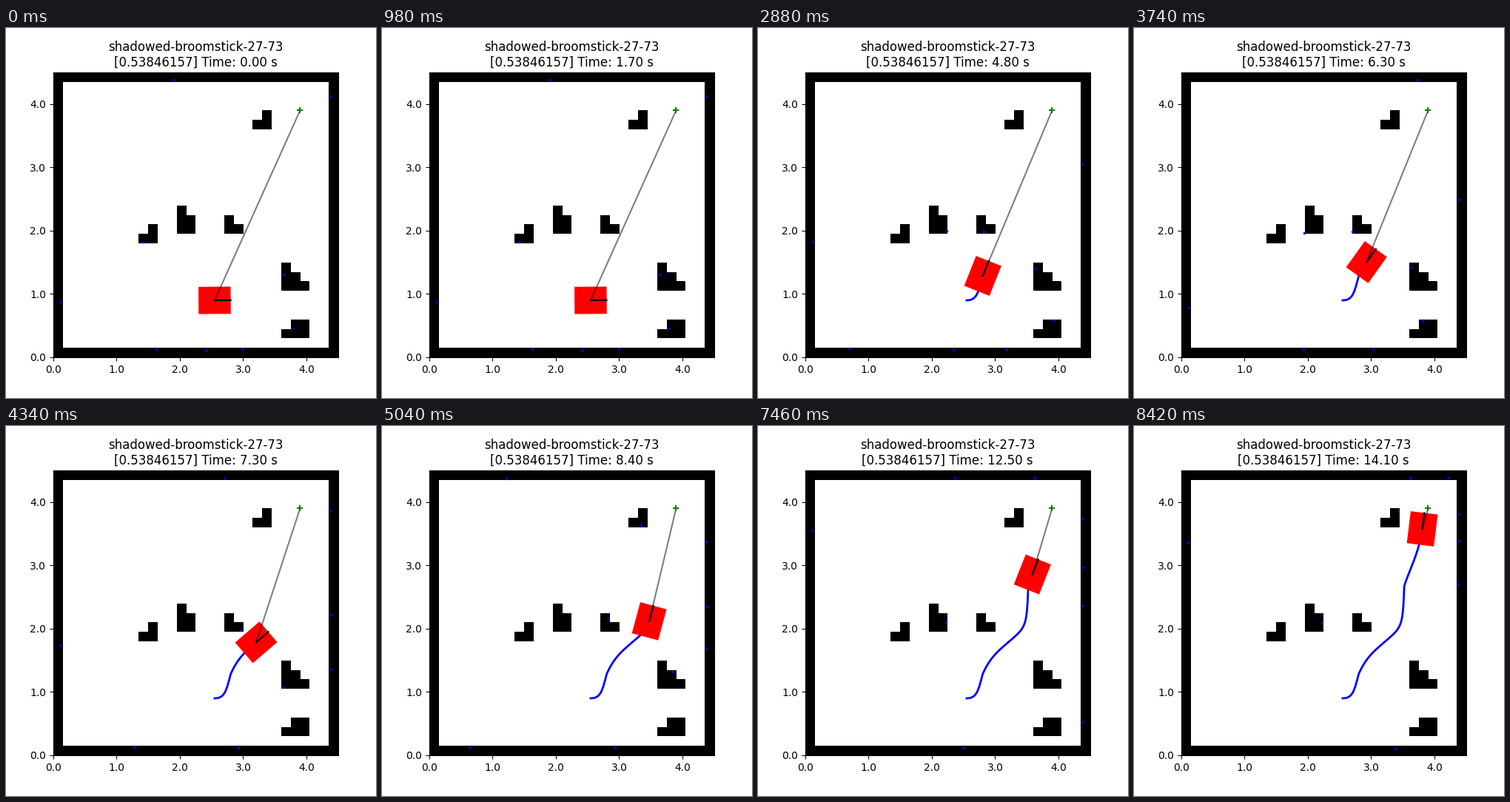
A matplotlib script for the animation above (8.44 s loop, 500 by 500 pixels).

```python
import numpy as np
import matplotlib.pyplot as plt
from matplotlib.animation import FuncAnimation
from matplotlib.patches import Rectangle

CELL, CELLS = 0.15, 30
SIZE = CELL * CELLS
START, GOAL = (2.55, 0.9), (3.9, 3.9)
LENGTH, WIDTH = 0.508, 0.430
STEPS = 142
TICK_MS, TICKS = 20, 422

# Obstacles: left column, bottom row, height of each column
BLOCKS = [
    (21, 24, (1, 2)), (9, 12, (1, 2)), (13, 13, (3, 2)),
    (18, 13, (2, 1)), (24, 7, (3, 2, 1)), (24, 2, (1, 2, 2)),
]

BEAMS = np.radians(np.arange(-180, 180, 40))
RANGES = np.arange(0, 6, 0.01)
SENSOR_SHIFT, DEPTH = -0.012, 0.03


def make_grid():
    grid = np.ones((CELLS, CELLS))
    grid[1:-1, 1:-1] = 0
    for col, row, heights in BLOCKS:
        for i, h in enumerate(heights):
            grid[row:row + h, col + i] = 1
    return grid


def unit(angle):
    return np.stack([np.cos(angle), np.sin(angle)], axis=-1)


def curve(p, out, pull_out, q, into, pull_in):
    """Bezier from p to q, leaving and arriving at headings in degrees."""
    p, q = np.array(p), np.array(q)
    a = p + pull_out * unit(np.radians(out))
    b = q - pull_in * unit(np.radians(into))
    t = np.linspace(0, 1, 200)[:, None]
    s = 1 - t
    return s**3 * p + 3 * s * s * t * a + 3 * s * t * t * b + t**3 * q


class Leg:
    """A drive at constant speed between two steps."""

    def __init__(self, depart, arrive, *curves):
        self.depart, self.arrive = depart, arrive
        self.pts = np.concatenate(curves)
        d = np.diff(self.pts, axis=0)
        self.dist = np.append(0, np.cumsum(np.hypot(*d.T)))

    def at(self, u):
        return np.array([np.interp(u * self.dist[-1], self.dist, c)
                         for c in self.pts.T])

    def pose(self, step):
        u = np.clip((step - self.depart) / (self.arrive - self.depart), 0, 1)
        d = self.at(min(u + 0.01, 1)) - self.at(max(u - 0.01, 0))
        return self.at(u), np.arctan2(d[1], d[0])


TURN_1, MID, TURN_2, END = ((2.805, 1.286), (3.170, 1.753),
                            (3.523, 2.670), (3.808, 3.577))
LEGS = [
    Leg(19, 32, curve(START, 0, 0.16, TURN_1, 75, 0.28)),
    Leg(56.7, 98, curve(TURN_1, 66, 0.28, MID, 41, 0.16),
        curve(MID, 41, 0.42, TURN_2, 88, 0.68)),
    Leg(120.8, 141, curve(TURN_2, 74, 0.23, END, 83.2, 0.37)),
]


def pose(step):
    """Drive the current leg, then turn on the spot towards the next."""
    begun = [leg for leg in LEGS if leg.depart <= step] or LEGS[:1]
    leg = begun[-1]
    pos, heading = leg.pose(step)
    if step > leg.arrive and leg is not LEGS[-1]:
        after = LEGS[len(begun)]
        u = (step - leg.arrive) / (after.depart - leg.arrive)
        _, aim = after.pose(after.depart)
        heading += u * u * (3 - 2 * u) * (aim - heading)
    return pos, heading


def scan(pos, heading):
    """Follow each beam to just inside the first occupied cell."""
    start = pos + SENSOR_SHIFT * unit(heading)
    rays = unit(BEAMS + heading)
    pts = start + RANGES[None, :, None] * rays[:, None, :]
    idx = np.clip((pts / CELL).astype(int), 0, CELLS - 1)
    hit = grid[idx[..., 1], idx[..., 0]].argmax(axis=1)
    return start + (RANGES[hit] + DEPTH)[:, None] * rays


grid = make_grid()
poses = [pose(k) for k in range(STEPS)]
path = np.array([p for p, _ in poses])

fig, ax = plt.subplots(figsize=(5, 5), dpi=100)
ax.imshow(grid, cmap="Greys", vmin=0, vmax=1, origin="lower",
          extent=(0, SIZE, 0, SIZE), interpolation="nearest")
for axis in (ax.xaxis, ax.yaxis):
    axis.set_ticks(range(5))
    axis.set_major_formatter("{x:.1f}")

trail, = ax.plot([], [], "b-", lw=2, zorder=2)
body = ax.add_patch(Rectangle((0, 0), LENGTH, WIDTH, facecolor="red",
                              rotation_point="center", zorder=3))
sight, = ax.plot([], [], "k-", alpha=0.5, zorder=4)
nose, = ax.plot([], [], "k-", zorder=4)
dots, = ax.plot([], [], "b.", ms=3, zorder=4)
ax.plot(*GOAL, "+", color="green", mew=1.5, zorder=4)
title = ax.set_title("")
ax.set(xlim=(0, SIZE), ylim=(0, SIZE))


def update(tick):
    # Steps last 20 and 100 ms in turn
    k = 2 * (tick // 6) + (tick % 6 > 0)
    pos, heading = poses[k]
    tip = pos + LENGTH / 2 * unit(heading)
    trail.set_data(*path[LEGS[0].depart:k + 1].T)
    body.set_xy(pos - np.array([LENGTH, WIDTH]) / 2)
    body.angle = np.degrees(heading)
    sight.set_data(*zip(pos, GOAL))
    nose.set_data(*zip(pos, tip))
    dots.set_data(*scan(pos, heading).T)
    title.set_text("shadowed-broomstick-27-73\n"
                   f"[0.53846157] Time: {k / 10:.2f} s")
    return trail, body, sight, nose, dots, title


anim = FuncAnimation(fig, update, frames=TICKS, interval=TICK_MS,
                     repeat=True, repeat_delay=0)
plt.show()
```
